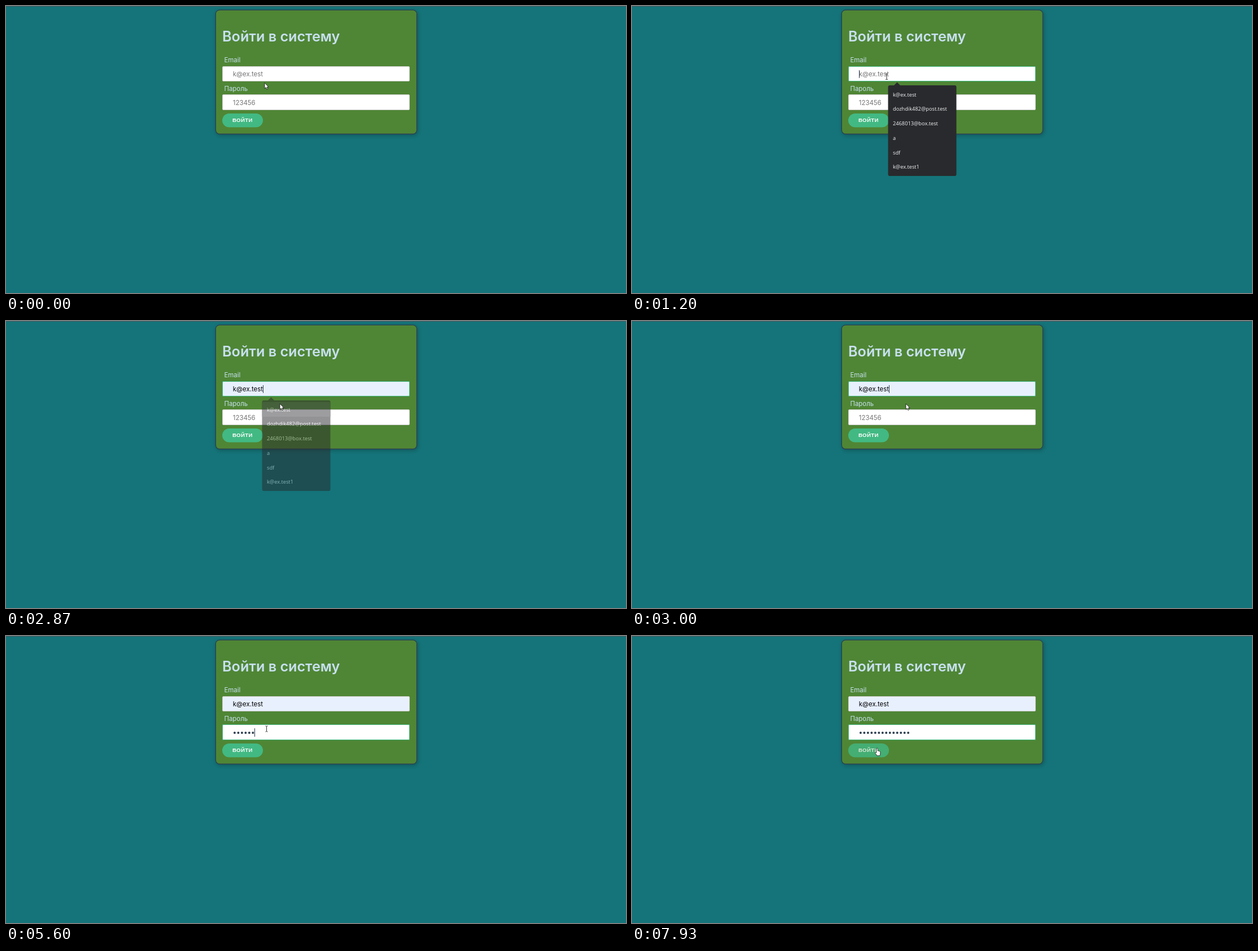
Animation of 1098x510 px, one loop 8 s. Source, as an HTML page:

```html
<!DOCTYPE html>
<html lang="ru">
<head>
<meta charset="utf-8">
<title>Войти в систему</title>
<style>
  html, body { margin: 0; width: 100%; height: 100%; overflow: hidden; background: #147479; }
  svg { display: block; width: 1098px; height: 510px; font: 11.4px Inter, sans-serif; font-optical-sizing: none; }
  .title { font-size: 25.15px; font-weight: 600; }
  .light { fill: #c8e0f0; }
  .hint { fill: #757575; }
  .field { fill: #fff; stroke: #ccc; }
  .focus { fill: none; stroke: #42b983; }
  .preview { font: 9.6px "Liberation Sans", Arial, sans-serif; }
  .action { font: bold 9.6px "Liberation Sans", Arial, sans-serif; letter-spacing: .4px; fill: #fff; }
  #popup text { font: 9.25px "Open Sans", sans-serif; fill: #f1f2f4; }
</style>
</head>
<body>
<svg viewBox="0 0 1098 510" xmlns="http://www.w3.org/2000/svg">
  <defs>
    <filter id="shadow" x="-10%" y="-10%" width="120%" height="125%">
      <feDropShadow dx="1.5" dy="2" stdDeviation="3.5" flood-opacity=".25"/>
    </filter>
  </defs>
  <rect width="1098" height="510" fill="#147479"/>
  <rect width="1098" height="1" fill="#45595f"/>
  <rect x="371.3" y="7.1" width="356.2" height="220.4" rx="7" fill="#508636" stroke="#2c3e50" stroke-width="1.3" filter="url(#shadow)"/>
  <text class="title light" x="383" y="63">Войти в систему</text>
  <text class="light" x="386.5" y="100.2">Email</text>
  <text class="light" x="386.5" y="151.1">Пароль</text>

  <rect id="emailField" class="field" x="383.5" y="107.5" width="331" height="26" rx="1.5"/>
  <rect id="emailFocus" class="focus" x="383.5" y="107.5" width="331" height="26" rx="1.5"/>
  <text id="email" x="401.8" y="124.7"></text>

  <rect class="field" x="383.5" y="157.5" width="331" height="27" rx="1.5"/>
  <rect id="passFocus" class="focus" x="383.5" y="157.5" width="331" height="27" rx="1.5"/>
  <text id="passHint" class="hint" x="401.8" y="175.5">123456</text>
  <g id="dots" fill="#2c3e50"></g>
  <rect id="caret" width="1" height="14" fill="#2c3e50"/>

  <g id="button">
    <rect x="383" y="191" width="72" height="24.5" rx="12.25" fill="#42b983"/>
    <text class="action" x="401" y="206.2">ВОЙТИ</text>
  </g>

  <g id="popup">
    <path d="M463 142L469.5 135.5L476 142Z" fill="#292a2d"/>
    <rect x="453.5" y="141" width="121" height="161" rx="3" fill="#292a2d"/>
    <rect id="rowHover" x="453.5" y="144" width="121" height="26" fill="#3d3e41"/>
  </g>

  <g id="cursor">
    <path id="arrow" d="M0 0V10.2L2.3 8.1L3.9 11.6L5.6 10.8L4.1 7.5H7.1Z" fill="#fff" stroke="#111" stroke-width=".8"/>
    <path id="beam" d="M-2 -5H-.6L0 -4.5L.6 -5H2M0 -4.5V4.5M-2 5H-.6L0 4.5L.6 5H2" fill="none" stroke="#333" stroke-width="1"/>
    <path id="hand" d="M-1.2 8V1Q-1.2 -.2 0 -.2Q1.2 -.2 1.2 1V4.5Q2.3 3.8 3 5Q4.1 4.5 4.6 5.6Q5.8 5.3 5.8 6.8V9.2Q5.8 11.4 4.8 13.2H-.3Q-1 11.2 -3 9Q-3.8 7.8 -3 7.2Q-2.2 6.8 -1.2 8Z" fill="#fff" stroke="#111" stroke-width=".8"/>
  </g>
</svg>
<script>
const LOOP = 8000, TICKS_PER_MS = 0.015;
const ADDRESS = 'k@ex.test';
const SUGGESTIONS = [ADDRESS, 'dozhdik482@post.test', '2468013@box.test', 'a', 'sdf', ADDRESS + '1'];
const KEYS = [63, 66, 71, 75, 80, 84, 90, 94, 96, 99, 101, 102, 104, 107];
const BLINK = 8, DOT_STEP = 6.48;

// Each move: tick before the first step, tick of arrival, destination.
const START = [458, 136.5];
const MOVES = [
  [5, 12, 451, 125.5],
  [29, 36, 485, 147],
  [45, 50, 461.5, 165],
  [110, 119, 434, 199.5]
];

const $ = id => document.getElementById(id);
const clamp = v => Math.max(0, Math.min(1, v));
const ramp = (n, from, to) => clamp((n - from) / (to - from));
const ease = p => p * p * (3 - 2 * p);
const show = (id, on) => $(id).setAttribute('visibility', on ? 'visible' : 'hidden');
const fade = (id, value) => $(id).setAttribute('opacity', value);

function setAll(node, attrs) {
  for (const key in attrs) node.setAttribute(key, attrs[key]);
}

function add(parent, tag, attrs, text = '') {
  const node = document.createElementNS('http://www.w3.org/2000/svg', tag);
  setAll(node, attrs);
  node.textContent = text;
  return $(parent).appendChild(node);
}

SUGGESTIONS.forEach((s, i) => add('popup', 'text', { x: 462, y: 160.7 + 25.7 * i }, s));
const dots = KEYS.map((_, i) => add('dots', 'circle', { cx: 404.9 + DOT_STEP * i, cy: 172, r: 2 }));

function pointer(n) {
  let [x, y] = START;
  for (const [from, to, toX, toY] of MOVES) {
    const p = ease(ramp(n, from, to));
    x += (toX - x) * p;
    y += (toY - y) * p;
  }
  return [x, y];
}

function drawCursor(x, y, popupOpen) {
  const overField = (y > 107 && y < 134) || (!popupOpen && y > 157 && y < 185);
  const overButton = y > 191 && x < 455;
  $('cursor').setAttribute('transform', `translate(${x} ${y})`);
  show('arrow', !overField && !overButton);
  show('beam', overField);
  show('hand', overButton);
}

function drawEmail(n, hovering) {
  const chosen = n >= 42, preview = hovering && !chosen;
  const email = $('email');
  email.textContent = ADDRESS;
  email.setAttribute('class', preview ? 'preview' : chosen ? '' : 'hint');
  $('emailField').style.fill = preview || chosen ? '#e8f0fe' : '#fff';
  fade('emailFocus', ramp(n, 14, 18) - ramp(n, 52, 56));
}

function drawPassword(n) {
  const typed = KEYS.filter(k => k <= n).length;
  dots.forEach((dot, i) => dot.setAttribute('visibility', i < typed ? 'visible' : 'hidden'));
  show('passHint', !typed);
  fade('passFocus', ramp(n, 52, 56));
  return typed;
}

function drawCaret(n, typed) {
  const inPassword = n >= 53;
  const since = typed ? KEYS[typed - 1] : inPassword ? 53 : n >= 42 ? 42 : 15;
  const phase = Math.floor((n - since) / (n < 42 ? 7.7 : BLINK));
  const emailX = n >= 42 ? 455 : 402;
  setAll($('caret'), inPassword
    ? { x: Math.floor(401.62 + DOT_STEP * typed) + (typed ? 0 : 1), y: 164, height: 15 }
    : { x: emailX, y: 114, height: 14 });
  show('caret', n >= 15 && phase % 2 === 0);
}

function render(ms) {
  const n = Math.floor(ms * TICKS_PER_MS + 0.06);
  const [x, y] = pointer(n);
  const popupOpen = n >= 16 && n < 45;
  const hovering = popupOpen && y >= 142;
  drawEmail(n, hovering);
  drawCaret(n, drawPassword(n));
  show('popup', popupOpen);
  fade('popup', 1 - ramp(n, 41, 45));
  show('rowHover', hovering);
  fade('button', 1 - 0.2 * ramp(n, 115, 119));
  drawCursor(x, y, popupOpen);
}

const began = performance.now();
function frame() {
  render((performance.now() - began) % LOOP);
  requestAnimationFrame(frame);
}
frame();
</script>
</body>
</html>
```
